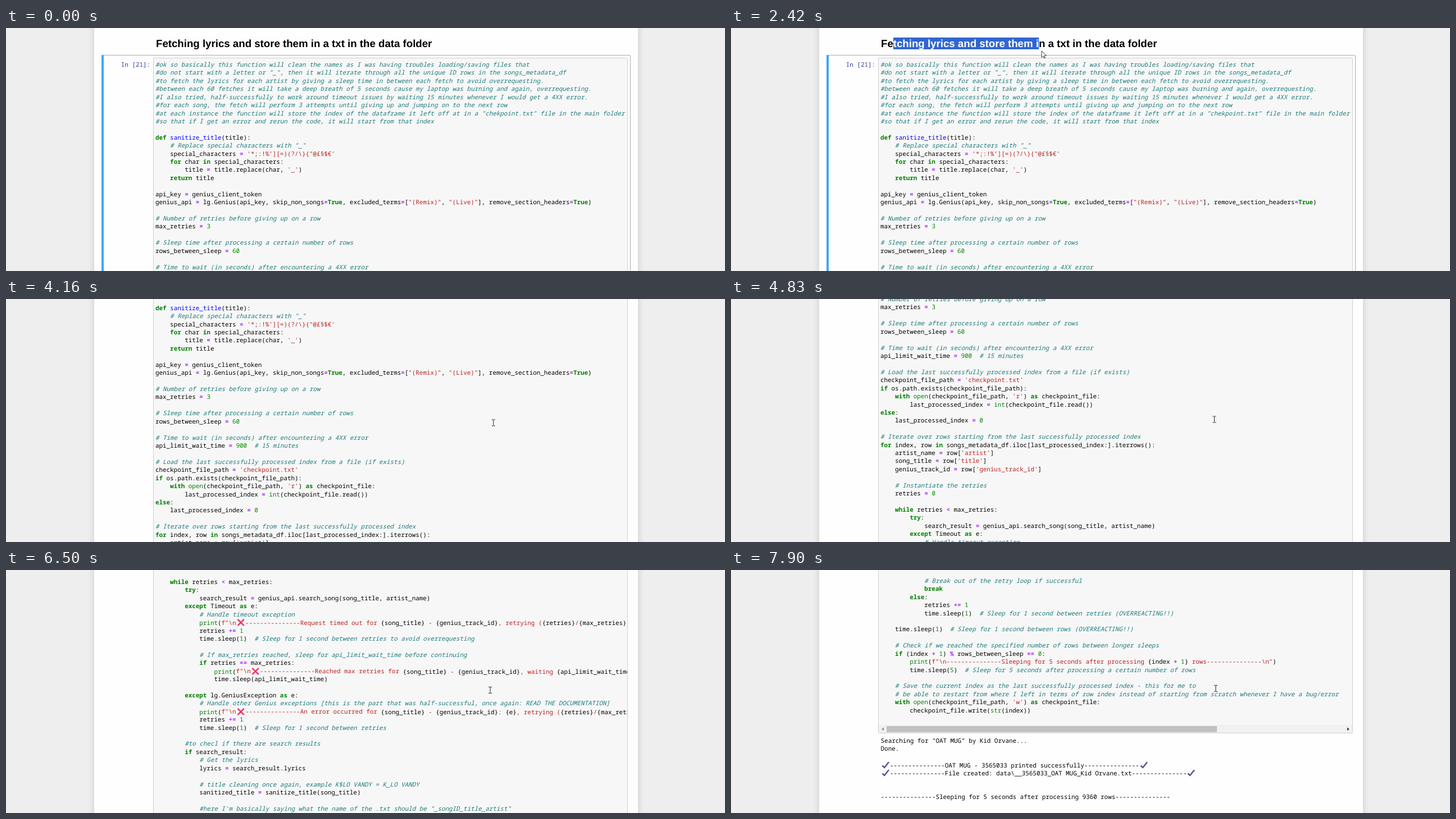
An HTML page that plays this animation: 1280x433 px, repeating every 8000 ms.

```html
<!DOCTYPE html>
<html lang="en">
<head>
<meta charset="utf-8">
<title>Notebook scroll</title>
<style>
html, body { margin: 0; width: 100%; height: 100%; overflow: hidden; background: #eee; text-rendering: geometricPrecision; }
#stage { position: relative; width: 1280px; height: 433px; overflow: hidden; }
#stage div, #cursor { position: absolute; }
#paper { left: 157px; top: -20px; width: 968px; height: 480px; background: #fefefe; box-shadow: 0 0 10px 1px rgba(87, 87, 87, .2); }
#page { left: 0; top: 0; width: 1280px; height: 2000px; }
.cell { left: 170px; width: 940px; border: 1px solid #ababab; border-radius: 2px; visibility: hidden; }
.cell::before { content: ""; position: absolute; left: -1px; top: -1px; width: 4.3px; height: calc(100% + 2px); background: #42a5f5; }
.cell.on { visibility: visible; }
#head-cell { top: 1px; height: 45px; }
#code-cell { top: 48px; height: 1700px; }
#heading { left: 267px; top: 17px; font: bold 18.67px/21px "Liberation Sans", Arial, sans-serif; white-space: pre; }
#picked { background: #3166d0; color: #fff; }
.mono { font: 10.888px/14.4245px "Noto Sans Mono", monospace; white-space: pre; }
#stage .mono p { margin: 0; height: 14.4245px; }
#prompt { left: 204.8px; top: 59px; color: #303f9f; }
#input { left: 262px; top: 53px; width: 843px; height: 1508px; border: 1px solid #cfcfcf; border-radius: 2px; background: #f7f7f7; overflow: hidden; }
#code { left: 3px; top: 5px; }
#bar { left: 0; bottom: 0; width: 843px; height: 14px; background: #f1f1f1; }
#thumb { left: 14px; top: 2px; width: 588px; height: 11px; background: #c1c1c1; }
#bar svg { position: absolute; left: 0; top: 0; }
#output { left: 266.6px; top: 1569.5px; }
.comment { color: #1e7b7b; font-style: italic; }
.string { color: #ba2121; }
.keyword { color: #008000; font-weight: bold; }
.builtin { color: #008000; }
.number { color: #008800; }
.operator { color: #a2f; font-weight: bold; }
.name { color: #00f; }
.mark { width: 16.3px; height: 13px; vertical-align: -2.4px; fill: none; stroke-linecap: round; stroke-linejoin: round; }
#cursor { left: 0; top: 0; overflow: visible; }
</style>
</head>
<body>
<div id="stage">
  <div id="paper"></div>
  <div id="page">
    <div id="head-cell" class="cell"></div>
    <div id="code-cell" class="cell"></div>
    <div id="heading"><span id="before"></span><span id="picked"></span><span id="after"></span></div>
    <div id="prompt" class="mono">In [21]:</div>
    <div id="input">
      <div id="code" class="mono"></div>
      <div id="bar"><div id="thumb"></div>
        <svg width="843" height="14"><path d="M9 4.500v6l-4-3z" fill="#8a8a8a"/><path d="M834 4.500v6l4-3z" fill="#404040"/></svg>
      </div>
    </div>
    <div id="output" class="mono"></div>
  </div>
  <svg id="cursor" width="1" height="1">
    <path id="arrow" d="M0 0V11.500L2.700 9 4.500 13 6.300 12.200 4.600 8.300H8.200Z" fill="#fff" stroke="#222" stroke-width=".9"/>
    <path id="beam" d="M-3-5.500H-.8L0-4.800.8-5.500H3M0-4.800V4.800M-3 5.500H-.8L0 4.800.8 5.500H3" fill="none" stroke="#222"/>
  </svg>
</div>
<script>
const source = String.raw`#ok so basically this function will clean the names as I was having troubles loading/saving files that
#do not start with a letter or "_", then it will iterate through all the unique ID rows in the songs_metadata_df
#to fetch the lyrics for each artist by giving a sleep time in between each fetch to avoid overrequesting.
#between each 60 fetches it will take a deep breath of 5 seconds cause my laptop was burning and again, overrequesting.
#I also tried, half-successfully to work around timeout issues by waiting 15 minutes whenever I would get a 4XX error.
#for each song, the fetch will perform 3 attempts until giving up and jumping on to the next row
#at each instance the function will store the index of the dataframe it left off at in a "chekpoint.txt" file in the main folder
#so that if I get an error and rerun the code, it will start from that index

def sanitize_title(title):
    # Replace special characters with "_"
    special_characters = '*;:!%’][=)(?/\}{"@£§$€'
    for char in special_characters:
        title = title.replace(char, '_')
    return title

api_key = genius_client_token
genius_api = lg.Genius(api_key, skip_non_songs=True, excluded_terms=["(Remix)", "(Live)"], remove_section_headers=True)

# Number of retries before giving up on a row
max_retries = 3

# Sleep time after processing a certain number of rows
rows_between_sleep = 60

# Time to wait (in seconds) after encountering a 4XX error
api_limit_wait_time = 900  # 15 minutes

# Load the last successfully processed index from a file (if exists)
checkpoint_file_path = 'checkpoint.txt'
if os.path.exists(checkpoint_file_path):
    with open(checkpoint_file_path, 'r') as checkpoint_file:
        last_processed_index = int(checkpoint_file.read())
else:
    last_processed_index = 0

# Iterate over rows starting from the last successfully processed index
for index, row in songs_metadata_df.iloc[last_processed_index:].iterrows():
    artist_name = row['artist']
    song_title = row['title']
    genius_track_id = row['genius_track_id']

    # Instantiate the retries
    retries = 0

    while retries < max_retries:
        try:
            search_result = genius_api.search_song(song_title, artist_name)
        except Timeout as e:
            # Handle timeout exception
            print(f"\n❌---------------Request timed out for {song_title} - {genius_track_id}, retrying ({retries}/{max_retries})")
            retries += 1
            time.sleep(1)  # Sleep for 1 second between retries to avoid overrequesting

            # If max_retries reached, sleep for api_limit_wait_time before continuing
            if retries == max_retries:
                print(f"\n❌---------------Reached max retries for {song_title} - {genius_track_id}, waiting {api_limit_wait_time}")
                time.sleep(api_limit_wait_time)

        except lg.GeniusException as e:
            # Handle other Genius exceptions [this is the part that was half-successful, once again: READ THE DOCUMENTATION]
            print(f"\n❌---------------An error occurred for {song_title} - {genius_track_id}: {e}, retrying ({retries}/{max_retries})")
            retries += 1
            time.sleep(1)  # Sleep for 1 second between retries

        #to checl if there are search results
        if search_result:
            # Get the lyrics
            lyrics = search_result.lyrics

            # title cleaning once again, example K$LO VANDY = K_LO VANDY
            sanitized_title = sanitize_title(song_title)

            #here I'm basically saying what the name of the .txt should be "_songID_title_artist"
            file_path = os.path.join('data', f"__{genius_track_id}_{sanitized_title}_{artist_name}.txt")

            #WRITING the lyrics to the .txt file
            try:
                with open(file_path, 'w', encoding='utf-8') as file:
                    file.write(lyrics)
                print(f"\n✔---------------{song_title} - {genius_track_id} printed successfully---------------✔")
                print(f"✔---------------File created: {file_path}---------------✔\n")
            except Exception as e:
                print(f"\n❌---------------Error writing file for {song_title} - {genius_track_id}: {e}---------------❌\n")

            # Break out of the retry loop if successful
            break
        else:
            retries += 1
            time.sleep(1)  # Sleep for 1 second between retries (OVERREACTING!!)

    time.sleep(1)  # Sleep for 1 second between rows (OVERREACTING!!)

    # Check if we reached the specified number of rows between longer sleeps
    if (index + 1) % rows_between_sleep == 0:
        print(f"\n---------------Sleeping for 5 seconds after processing {index + 1} rows---------------\n")
        time.sleep(5)  # Sleep for 5 seconds after processing a certain number of rows

    # Save the current index as the last successfully processed index - this for me to
    # be able to restart from where I left in terms of row index instead of starting from scratch whenever I have a bug/error
    with open(checkpoint_file_path, 'w') as checkpoint_file:
        checkpoint_file.write(str(index))`;

const output = String.raw`Searching for "OAT MUG" by Kid Orvane...
Done.

✔---------------OAT MUG - 3565033 printed successfully---------------✔
✔---------------File created: data\__3565033_OAT MUG_Kid Orvane.txt---------------✔


---------------Sleeping for 5 seconds after processing 9360 rows---------------`;

const $ = id => document.getElementById(id);

const token = new RegExp([
  /(?<comment>#.*)/, /(?<format>f"[^"]*")/, /(?<string>'[^']*'|"[^"]*")/,
  /\b(?<keyword>def|for|in|return|if|else|with|as|while|try|except|break|True)\b/,
  /\b(?<builtin>print|open|int|str)(?=\()/, /(?<name>(?<=def )\w+)/,
  /\b(?<number>\d+)\b/, /(?<operator>[-+*\/%<=>]+)/
].map(r => r.source).join("|"), "g");

const span = (kind, text) => `<span class="${kind}">${text.replace("<", "&lt;")}</span>`;

function highlight(text) {
  return text.replace(token, (match, ...rest) => {
    const kinds = rest.at(-1);
    const kind = Object.keys(kinds).find(k => kinds[k]);
    if (kind !== "format") return span(kind, match);
    return match.split(/(\{[^}]*\})/)
      .map(part => part[0] === "{" ? highlight(part) : span("string", part)).join("");
  });
}

const mark = (path, color) =>
  `<svg class="mark" viewBox="0 0 16.3 13"><path d="${path}" stroke="${color}" stroke-width="2.6"/></svg>`;
const cross = mark("M3.200 1.600L13 11.400M13 1.600L3.200 11.400", "#f92f60");
const tick = mark("M3.200 8.200L6.200 11 13.300 2", "#5d5494");
const lines = (text, format) => text.split("\n").map(line =>
  `<p>${format(line).replaceAll("❌", cross).replaceAll("✔", tick)}</p>`).join("");

$("code").innerHTML = lines(source, highlight);
$("output").innerHTML = lines(output, line => line);

const heading = "Fetching lyrics and store them in a txt in the data folder";
const notch = 84.8, glide = 250;
const wheel = [3050, 3390, 4108, 4180, 5060, 5190, 5458, 5850, 6436, 6550, 6665, 6780, 7330, 7490, 7640];

// time, x, y
const path = [
  [60, 1217, 446], [870, 974, 171], [1270, 974, 171], [1940, 287, 26], [2080, 287, 26],
  [2420, 553, 41], [2714, 757, 43], [2880, 757, 43], [3240, 880, 200], [3870, 880, 200],
  [4090, 868, 221], [4430, 866, 217], [4740, 866, 217], [4830, 860.5, 214.5],
  [5680, 860.5, 214.5], [6100, 862, 214], [6500, 862, 214], [7030, 862, 211], [8000, 863, 211]
];

const clamp = v => Math.min(1, Math.max(0, v));
const smooth = v => (v = clamp(v), v * v * (3 - 2 * v));

function pointer(t) {
  const i = Math.max(1, path.findIndex(p => p[0] >= t));
  const [t0, x0, y0] = path[i - 1], [t1, x1, y1] = path[i];
  const k = smooth((t - t0) / (t1 - t0));
  return [x0 + (x1 - x0) * k, y0 + (y1 - y0) * k];
}

function draw(t) {
  const scroll = notch * wheel.reduce((sum, start) => sum + smooth((t - start) / glide), 0);
  $("page").style.transform = `translateY(${-Math.round(scroll)}px)`;

  const end = Math.round(2 + 56 * clamp((t - 2080) / 634));
  $("before").textContent = heading.slice(0, 2);
  $("picked").textContent = heading.slice(2, end);
  $("after").textContent = heading.slice(end);

  const released = t >= 2740;
  $("head-cell").classList.toggle("on", released);
  $("code-cell").classList.toggle("on", !released);

  const [x, y] = pointer(t);
  const isArrow = x > 1107 || (y > 38 && y < 53);
  $("cursor").style.transform = `translate(${x}px, ${y}px)`;
  $("arrow").style.display = isArrow ? "" : "none";
  $("beam").style.display = isArrow ? "none" : "";
}

function frame() {
  draw(performance.now() % 8000);
  requestAnimationFrame(frame);
}
frame();
</script>
</body>
</html>
```
